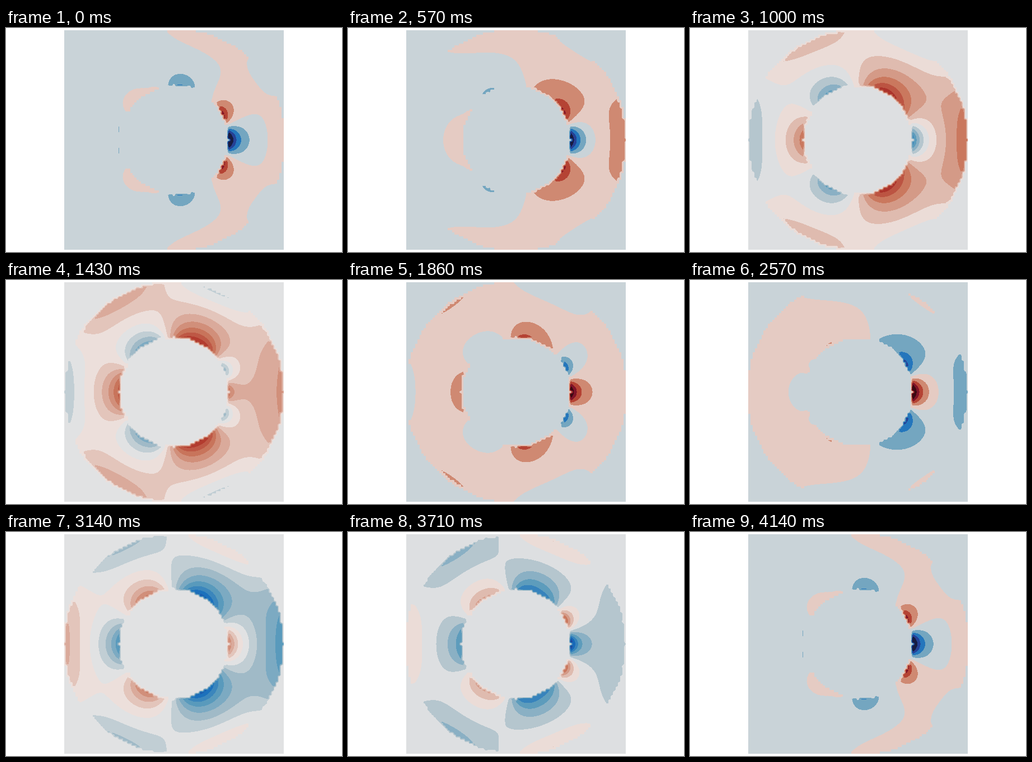
An HTML page with a canvas that plays this animation: 600x400 px, repeating every 4.28 s.

```html
<!DOCTYPE html>
<html lang="en">
<head>
<meta charset="utf-8">
<title>Wave field in a ring</title>
<style>
  html, body { margin: 0; width: 100%; height: 100%; overflow: hidden; background: #fff; }
  canvas { display: block; }
</style>
</head>
<body>
<canvas id="stage" width="600" height="400"></canvas>
<script>
const ctx = document.getElementById('stage').getContext('2d');
const SIZE = 392, CELLS = 100, POINTS = CELLS + 1;
const LOOP = 4280, STEPS = 29, COLOR_LIMIT = 4.44, TOP_MODE = 9;
const BANDS = 40;

// Diverging colours from the lowest to the highest value
const PALETTE = [
  [23, 28, 66], [38, 62, 148], [23, 110, 188], [91, 155, 188], [170, 191, 201],
  [241, 236, 235],
  [220, 178, 164], [201, 118, 92], [177, 55, 43], [125, 17, 40], [60, 9, 17]
];

// Amplitude of cos(m * angle) on the inner and outer circle, each as [cosine, sine] of time.
const LOW_MODES = [
  { inner: [-.39, .58], outer: [-.15, .325] },
  { inner: [.03, .57], outer: [.44, .58] },
  { inner: [.1, -.12], outer: [0, .1] },
  { inner: [0, -2.16], outer: [-.26, .92] }
];

function mode(m) {
  if (m < LOW_MODES.length) return LOW_MODES[m];
  const size = -5.6 / (m - .4);
  const inner = [size, .14 * size];
  return { inner, outer: inner.map(v => -3.5 * v / 2 ** m) };
}

// Harmonic function of r that takes the given values at r = 1 and r = 2
function radial(m, inner, outer, r) {
  if (m === 0) return inner + (outer - inner) * Math.log2(r);
  const growing = (outer * 2 ** m - inner) / (4 ** m - 1);
  return (inner - growing) * r ** -m + growing * r ** m;
}

// The field on the grid for one part: 0 = cosine of time, 1 = sine of time
function sampleField(part) {
  const grid = new Float64Array(POINTS * POINTS);
  for (let j = 0; j < POINTS; j++) {
    for (let i = 0; i < POINTS; i++) {
      const x = (i - 50) / 25, y = (j - 50) / 25, r = Math.hypot(x, y);
      if (r <= 1 + 1e-9 || r > 2 + 1e-9) continue;
      const angle = Math.atan2(Math.abs(y), x);
      for (let m = 0; m <= TOP_MODE; m++) {
        const { inner, outer } = mode(m);
        grid[j * POINTS + i] += radial(m, inner[part], outer[part], r) * Math.cos(m * angle);
      }
    }
  }
  return grid;
}

function color(value) {
  const p = Math.min(10, Math.max(0, 5 + 5 * value / COLOR_LIMIT));
  const i = Math.min(9, Math.floor(p));
  const [r, g, b] = PALETTE[i].map((c, k) => Math.round(c + (PALETTE[i + 1][k] - c) * (p - i)));
  return (255 << 24 | b << 16 | g << 8 | r) >>> 0;
}

// Contour spacing: the next round step above the strength of the field
function contourStep(phase) {
  const strength = 1.3 * Math.abs(Math.sin(phase - 115 * Math.PI / 180)) - .12;
  return [.4, .5, .6, .8].find(step => step >= strength) || 1;
}

const cosField = sampleField(0), sinField = sampleField(1);
const field = new Float64Array(POINTS * POINTS);
const image = ctx.createImageData(SIZE, SIZE);
const pixels = new Uint32Array(image.data.buffer);

function draw(index) {
  const phase = 2 * Math.PI * (index % STEPS) / STEPS;
  const c = Math.cos(phase), s = Math.sin(phase), step = contourStep(phase);
  for (let k = 0; k < field.length; k++) field[k] = cosField[k] * c + sinField[k] * s;

  const colors = Array.from({ length: 2 * BANDS }, (_, k) => color((k - BANDS + .5) * step));
  for (let py = 0; py < SIZE; py++) {
    const gy = (py + .5) * CELLS / SIZE, j = Math.floor(gy), fy = gy - j;
    for (let px = 0; px < SIZE; px++) {
      const gx = (px + .5) * CELLS / SIZE, i = Math.floor(gx), fx = gx - i;
      const k = j * POINTS + i;
      const top = field[k] + (field[k + 1] - field[k]) * fx;
      const low = field[k + POINTS] + (field[k + POINTS + 1] - field[k + POINTS]) * fx;
      const band = Math.ceil((top + (low - top) * fy) / step) - 1 + BANDS;
      pixels[py * SIZE + px] = colors[Math.min(2 * BANDS - 1, Math.max(0, band))];
    }
  }
  ctx.putImageData(image, 104, 4);
}

let shown = -1;
const start = performance.now();
function tick() {
  const time = (performance.now() - start) % LOOP;
  const index = Math.min(STEPS, Math.floor((time + 5) * 7 / 1000));
  if (index !== shown) draw(shown = index);
  requestAnimationFrame(tick);
}
tick();
</script>
</body>
</html>
```
